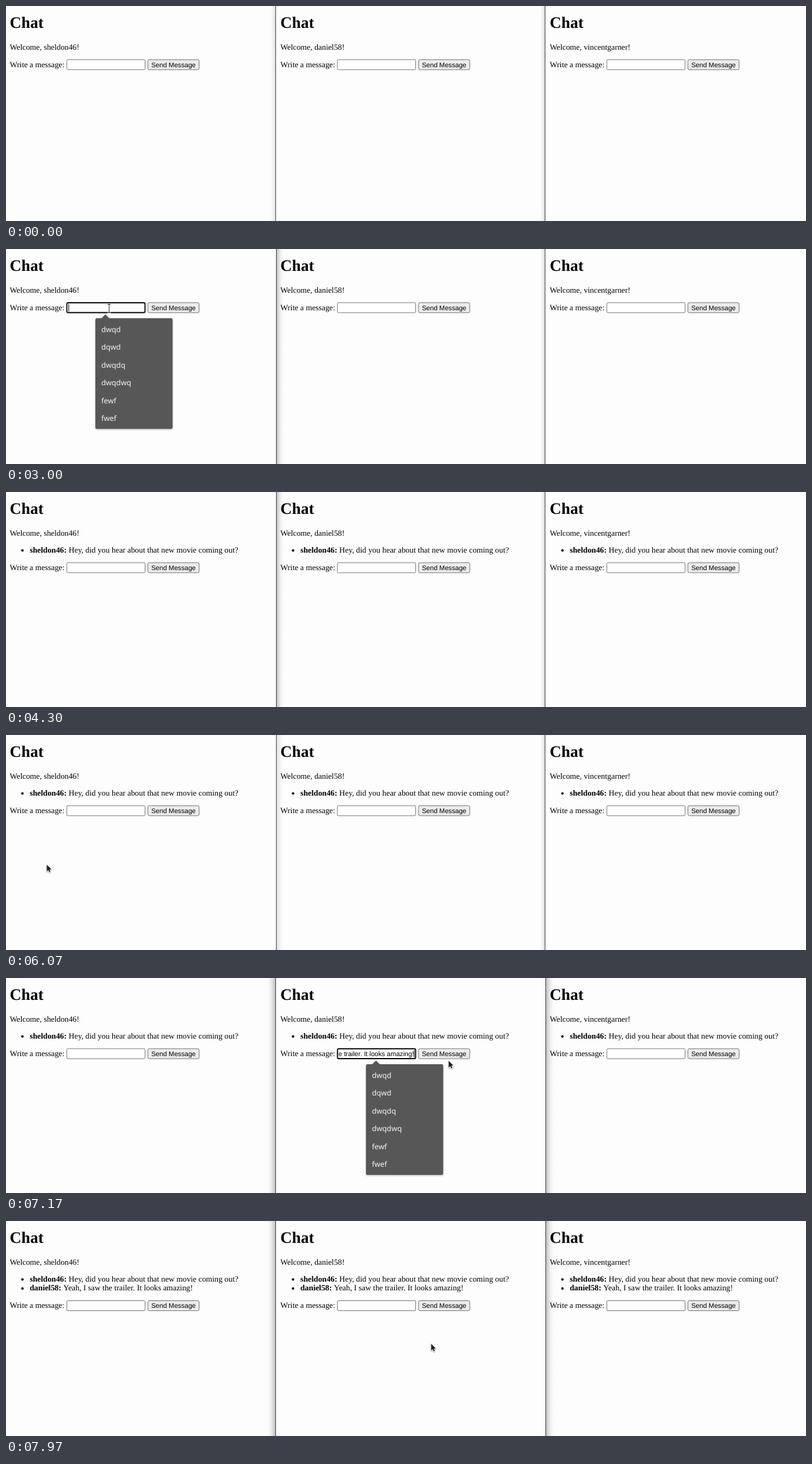
Write an HTML page with a canvas that moves like this. It is 1280x344 px and loops after 8000 ms.

```html
<!DOCTYPE html>
<html lang="en">
<head>
<meta charset="utf-8">
<title>Chat</title>
<style>
html, body { margin: 0; width: 100%; height: 100%; overflow: hidden; background: #fdfdfd; }
canvas { display: block; }
</style>
</head>
<body>
<canvas id="stage" width="1280" height="344"></canvas>
<script>
const ctx = document.getElementById('stage').getContext('2d');
const LOOP = 8000;
const SERIF = '"Liberation Serif", "Times New Roman", serif';
const SANS = '"Liberation Sans", Arial, sans-serif';
const MENU_FONT = '11.9px "Noto Sans", "Open Sans", sans-serif';
const BG = '#fdfdfd';

const panels = [
  { x: 0, user: 'sheldon46' },
  { x: 433, user: 'daniel58' },
  { x: 864, user: 'vincentgarner' }
];

// One entry per message: who writes it and when each step happens.
const posts = [
  { panel: 0, text: 'Hey, did you hear about that new movie coming out?',
    focus: 2830, open: 2850, paste: 3060, close: 3120, send: 3670 },
  { panel: 1, text: 'Yeah, I saw the trailer. It looks amazing!',
    focus: 6840, open: 6890, paste: 7060, close: 7190, send: 7730 }
];

const suggestions = ['dwqd', 'dqwd', 'dwqdq', 'dwqdwq', 'fewf', 'fwef'];

// Pointer tracks: [time, x, y]
const tracks = [
  [[2130, 60, 217], [2670, 165, 95], [3080, 165, 95], [3330, 270, 96.5],
   [3640, 262, 97], [4300, 252, 158]],
  [[6070, 65, 207], [6800, 590, 122], [7020, 590, 122], [7170, 708, 132],
   [7420, 703, 122], [7720, 700, 122], [7970, 680, 196], [8001, 680, 196]]
];

const INPUT = { x: 96.8, w: 126.2, h: 17 };
const BUTTON = { x: 226.5, w: 83, h: 17 };

const clamp = v => Math.min(1, Math.max(0, v));
const smooth = p => p * p * (3 - 2 * p);
const mix = (a, b, p) => a + (b - a) * p;

function write(text, x, y, font, color = '#000', align = 'left') {
  ctx.font = font;
  ctx.fillStyle = color;
  ctx.textAlign = align;
  ctx.fillText(text, x, y);
  return ctx.measureText(text).width;
}

function box(x, y, w, h, r, fill, stroke, line = 1) {
  ctx.beginPath();
  ctx.roundRect(x, y, w, h, r);
  if (fill) {
    ctx.fillStyle = fill;
    ctx.fill();
  }
  if (stroke) {
    ctx.strokeStyle = stroke;
    ctx.lineWidth = line;
    ctx.stroke();
  }
}

function shadow(x, width, alpha) {
  const g = ctx.createLinearGradient(x, 0, x + width, 0);
  for (let i = 0; i <= 4; i++) {
    g.addColorStop(i / 4, `rgba(50,50,60,${alpha * (1 - i / 4) ** 2})`);
  }
  ctx.fillStyle = g;
  ctx.fillRect(Math.min(x, x + width), 0, Math.abs(width), 344);
}

function divider(x) {
  ctx.fillStyle = '#4a4a50';
  ctx.fillRect(x, 0, 1, 344);
}

// The active window casts the stronger shadow.
function drawEdges(t) {
  if (t >= posts[1].focus) {
    shadow(431, -14, 0.32);
    shadow(864, 14, 0.32);
    divider(431);
    divider(863);
    return;
  }
  const left = t >= posts[0].focus;
  if (left) shadow(433, 12, mix(0.32, 0.16, clamp((t - 5270) / 70)));
  else shadow(431, -9, 0.16);
  shadow(862, -9, 0.18);
  divider(left ? 432 : 431);
  divider(862);
}

const sentBy = t => posts.filter(p => t >= p.send);
const formShift = count => count ? 27.2 + 14.4 * (count - 1) : 0;

function pointerAt(t) {
  const track = tracks.find(k => t >= k[0][0] && t < k[k.length - 1][0]);
  if (!track) return null;
  const i = track.findIndex(k => t < k[0]);
  const [t0, x0, y0] = track[i - 1];
  const [t1, x1, y1] = track[i];
  const p = smooth((t - t0) / (t1 - t0));
  return { x: mix(x0, x1, p), y: mix(y0, y1, p) };
}

const over = (pt, px, part, y) => pt && pt.x > px + part.x &&
  pt.x < px + part.x + part.w && pt.y > y && pt.y < y + part.h;

function drawInput(x, y, post, t) {
  if (!post) {
    box(x + 0.5, y + 0.5, INPUT.w - 1, INPUT.h - 1, 1.5, '#fff', '#7a7a7a');
    return;
  }
  box(x + 0.6, y + 0.6, INPUT.w - 1.2, INPUT.h - 1.2, 2, '#fff', '#101010', 1.9);
  const pasted = t >= post.paste;
  const end = pasted ? x + INPUT.w - 3.4 : x + 3.2;
  if (pasted) {
    ctx.save();
    ctx.beginPath();
    ctx.rect(x + 2.6, y, INPUT.w - 5, INPUT.h);
    ctx.clip();
    write(post.text, end, y + 12.1, `10.667px ${SANS}`, '#000', 'right');
    ctx.restore();
  }
  const since = pasted ? post.paste : post.focus;
  if ((t - since) % 1000 < 500) {
    ctx.fillStyle = '#000';
    ctx.fillRect(end, y + 2.6, 0.9, 12);
  }
}

function drawPanel({ x, user }, index, t, pointer) {
  const left = x + 6;
  const sent = sentBy(t);
  const shift = formShift(sent.length);
  write('Chat', left, 34.8, `bold 25.6px ${SERIF}`);
  write(`Welcome, ${user}!`, left, 69.7, `12.8px ${SERIF}`);

  sent.forEach((post, i) => {
    const y = 96.9 + i * 14.4;
    ctx.fillStyle = '#000';
    ctx.beginPath();
    ctx.arc(x + 26.3, y - 3.4, 2, 0, 7);
    ctx.fill();
    const name = `${panels[post.panel].user}:`;
    const w = write(name, left + 32, y, `bold 12.8px ${SERIF}`);
    write(post.text, left + 32 + w + 3.2, y, `12.8px ${SERIF}`);
  });

  const y = 85.4 + shift;
  write('Write a message:', left, y + 12.1, `12.8px ${SERIF}`);
  const draft = posts.find(p => p.panel === index && t >= p.focus && t < p.send);
  drawInput(x + INPUT.x, y, draft, t);
  const fill = over(pointer, x, BUTTON, y) ? '#e5e5e5' : '#ececec';
  box(x + BUTTON.x + 0.5, y + 0.5, BUTTON.w - 1, BUTTON.h - 1, 2.2, fill, '#767676');
  write('Send Message', x + BUTTON.x + BUTTON.w / 2, y + 12.1,
    `10.667px ${SANS}`, '#000', 'center');
}

function drawMenu(post, t) {
  const shown = clamp((t - post.open) / 130) - clamp((t - post.close) / 140);
  if (shown <= 0) return;
  const x = panels[post.panel].x + 143;
  const y = 110.7 + formShift(sentBy(t).length);
  const w = 123.5, h = 177, scale = 0.96 + 0.04 * shown;
  ctx.save();
  ctx.globalAlpha = shown;
  ctx.translate(x + w / 2, y + h / 2);
  ctx.scale(scale, scale);
  ctx.translate(-w / 2, -h / 2);
  ctx.shadowColor = 'rgba(0,0,0,0.3)';
  ctx.shadowBlur = 3;
  ctx.shadowOffsetY = 1;
  ctx.beginPath();
  ctx.roundRect(0, 0, w, h, 2.5);
  ctx.moveTo(9.5, 0.5);
  ctx.lineTo(16, -6);
  ctx.lineTo(22.5, 0.5);
  ctx.fillStyle = '#575757';
  ctx.fill();
  ctx.shadowColor = 'transparent';
  suggestions.forEach((word, i) => write(word, 9.4, 21.8 + i * 28.5, MENU_FONT, '#f4f4f4'));
  ctx.restore();
}

function polygon(points) {
  ctx.beginPath();
  points.forEach(([x, y]) => ctx.lineTo(x, y));
  ctx.closePath();
}

function drawPointer({ x, y }, beam) {
  ctx.save();
  ctx.translate(x, y);
  if (beam) {
    for (const [color, line] of [['#fff', 2.4], ['#222', 1]]) {
      ctx.beginPath();
      ctx.moveTo(-2.5, -6.5);
      ctx.lineTo(2.5, -6.5);
      ctx.moveTo(0, -6.5);
      ctx.lineTo(0, 6.5);
      ctx.moveTo(-2.5, 6.5);
      ctx.lineTo(2.5, 6.5);
      ctx.strokeStyle = color;
      ctx.lineWidth = line;
      ctx.stroke();
    }
  } else {
    polygon([[0.3, 0.4], [0.3, 11.2], [2.7, 9], [4.3, 12.6], [6.1, 11.8],
      [4.5, 8.3], [7.7, 8]]);
    ctx.shadowColor = 'rgba(0,0,0,0.4)';
    ctx.shadowBlur = 2;
    ctx.shadowOffsetY = 1;
    ctx.strokeStyle = '#fff';
    ctx.lineWidth = 1.4;
    ctx.stroke();
    ctx.shadowColor = 'transparent';
    ctx.fillStyle = '#1e1e1e';
    ctx.fill();
  }
  ctx.restore();
}

function draw(t) {
  const pointer = pointerAt(t);
  ctx.fillStyle = BG;
  ctx.fillRect(0, 0, 1280, 344);
  drawEdges(t);
  panels.forEach((p, i) => drawPanel(p, i, t, pointer));
  posts.forEach(p => drawMenu(p, t));
  if (pointer) {
    const y = 85.4 + formShift(sentBy(t).length);
    drawPointer(pointer, panels.some(p => over(pointer, p.x, INPUT, y)));
  }
}

ctx.textRendering = 'geometricPrecision';
const start = performance.now();
function tick() {
  draw((performance.now() - start) % LOOP);
  requestAnimationFrame(tick);
}
tick();
</script>
</body>
</html>
```
